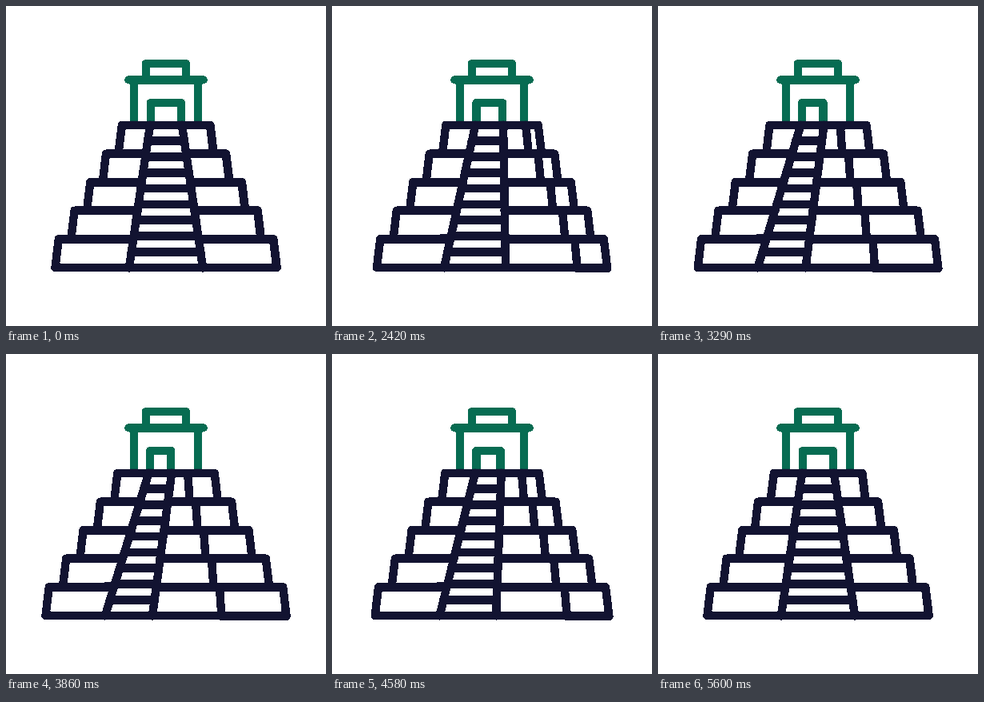
An HTML page with a canvas that plays this animation: 400x400 px, repeating every 5660 ms.

```html
<!DOCTYPE html>
<html lang="en">
<head>
<meta charset="utf-8">
<title>Pyramid</title>
<style>
html, body { margin: 0; width: 100%; height: 100%; overflow: hidden; background: #fff; }
canvas { display: block; width: 400px; height: 400px; }
</style>
</head>
<body>
<canvas id="stage" width="400" height="400"></canvas>
<script>
const ctx = document.getElementById('stage').getContext('2d', { willReadFrequently: true });
const GREEN = '#076c52', NAVY = '#121331';
const SIZE = 400, LOOP = 5660, START = 2030, PEAK = 3700, END = 5600, STEP = 30;
const TOP = 149, BASE = 327, TIERS = 5, STAIRS = 9;

const mix = (a, b, k) => a + (b - a) * k;
const clamp = v => Math.min(1, Math.max(0, v));

// Cubic easing with control points (x1, 0) and (x2, 1)
function ease(u, x1, x2) {
  let lo = 0, hi = 1;
  for (let i = 0; i < 24; i++) {
    const s = (lo + hi) / 2, r = 1 - s;
    const x = 3 * r * r * s * x1 + 3 * r * s * s * x2 + s * s * s;
    if (x < u) lo = s; else hi = s;
  }
  return lo * lo * (3 - 2 * lo);
}

function turnAt(time) {
  if (time < START || time >= END) return 0;
  const t = START + Math.floor((time - START) / STEP) * STEP;
  return t < PEAK
    ? ease(clamp((t - START + 5) / (PEAK - START)), 0.2, 0.15)
    : 1 - ease(clamp((t - PEAK) / (END - PEAK)), 0.55, 0.55);
}

function line(color, ...points) {
  ctx.strokeStyle = color;
  ctx.beginPath();
  points.forEach(([x, y]) => ctx.lineTo(x, y));
  ctx.stroke();
}

function drawTemple(turn) {
  const doorLeft = 181 - turn, doorRight = 219 - 13 * turn;
  line(GREEN, [175, 92], [175, 72], [225, 72], [225, 92]);
  line(GREEN, [153.5, 92.4], [246.5, 92.4]);
  line(GREEN, [160, 92], [160, TOP]);
  line(GREEN, [240, 92], [240, TOP]);
  line(GREEN, [doorLeft, TOP], [doorLeft, 121], [doorRight, 121], [doorRight, TOP]);
}

function drawPyramid(turn) {
  const height = (BASE - TOP) / TIERS;
  const topLeft = 180 - 1.7 * turn, baseLeft = 154 - 30.3 * turn;
  const topRight = 220 - 13 * turn, baseRight = 246 - 63.5 * turn;
  const stairLeft = y => mix(topLeft, baseLeft, (y - TOP) / (BASE - TOP));
  const stairRight = y => mix(topRight, baseRight, (y - TOP) / (BASE - TOP));

  for (let i = 0; i < TIERS; i++) {
    const y = TOP + i * height, bottom = y + height;
    const grow = (5.5 + 1.65 * i) * turn;
    const half = 55.2 + 19.75 * i, foot = half + 4.3;
    const slide = (28.3 + 9.9 * i) * turn;
    for (const side of [-1, 1]) {
      const stair = side < 0 ? stairLeft : stairRight;
      line(NAVY, [stair(y), y], [200 + side * (half + grow), y],
        [200 + side * (foot + grow), bottom], [stair(bottom), bottom]);
    }
    const innerFoot = 200 + foot - slide - 1.8 * turn;
    line(NAVY, [200 + half - slide, y], [innerFoot, bottom]);
    if (i === TIERS - 1 && turn > 0) {
      line(NAVY, [innerFoot, BASE + 1], [200 + foot + grow, BASE + 1]);
    }
  }

  line(NAVY, [topLeft, TOP], [topRight, TOP]);
  line(NAVY, [baseLeft, BASE], [baseRight, BASE]);
  line(NAVY, [topLeft, TOP], [baseLeft, BASE]);
  line(NAVY, [topRight, TOP], [baseRight, BASE]);
  for (let i = 1; i < STAIRS; i++) {
    const y = mix(TOP, BASE, i / STAIRS);
    line(NAVY, [stairLeft(y), y], [stairRight(y), y]);
  }
  // Slightly raised ledge beside the stairs
  if (turn > 0) line(NAVY, [146 - 24 * turn, 290.8], [stairLeft(290.8), 290.8]);
}

// Gives every stroke a hard, unsmoothed edge
function hardenEdges() {
  const image = ctx.getImageData(0, 0, SIZE, SIZE);
  for (let i = 3; i < image.data.length; i += 4) {
    image.data[i] = image.data[i] < 128 ? 0 : 255;
  }
  ctx.putImageData(image, 0, 0);
}

function draw(now) {
  const turn = turnAt(now % LOOP);
  ctx.clearRect(0, 0, SIZE, SIZE);
  ctx.lineWidth = 10.4;
  ctx.lineCap = ctx.lineJoin = 'round';
  drawTemple(turn);
  drawPyramid(turn);
  hardenEdges();
}

const begin = performance.now();
function frame() {
  draw(performance.now() - begin);
  requestAnimationFrame(frame);
}
frame();
</script>
</body>
</html>
```
